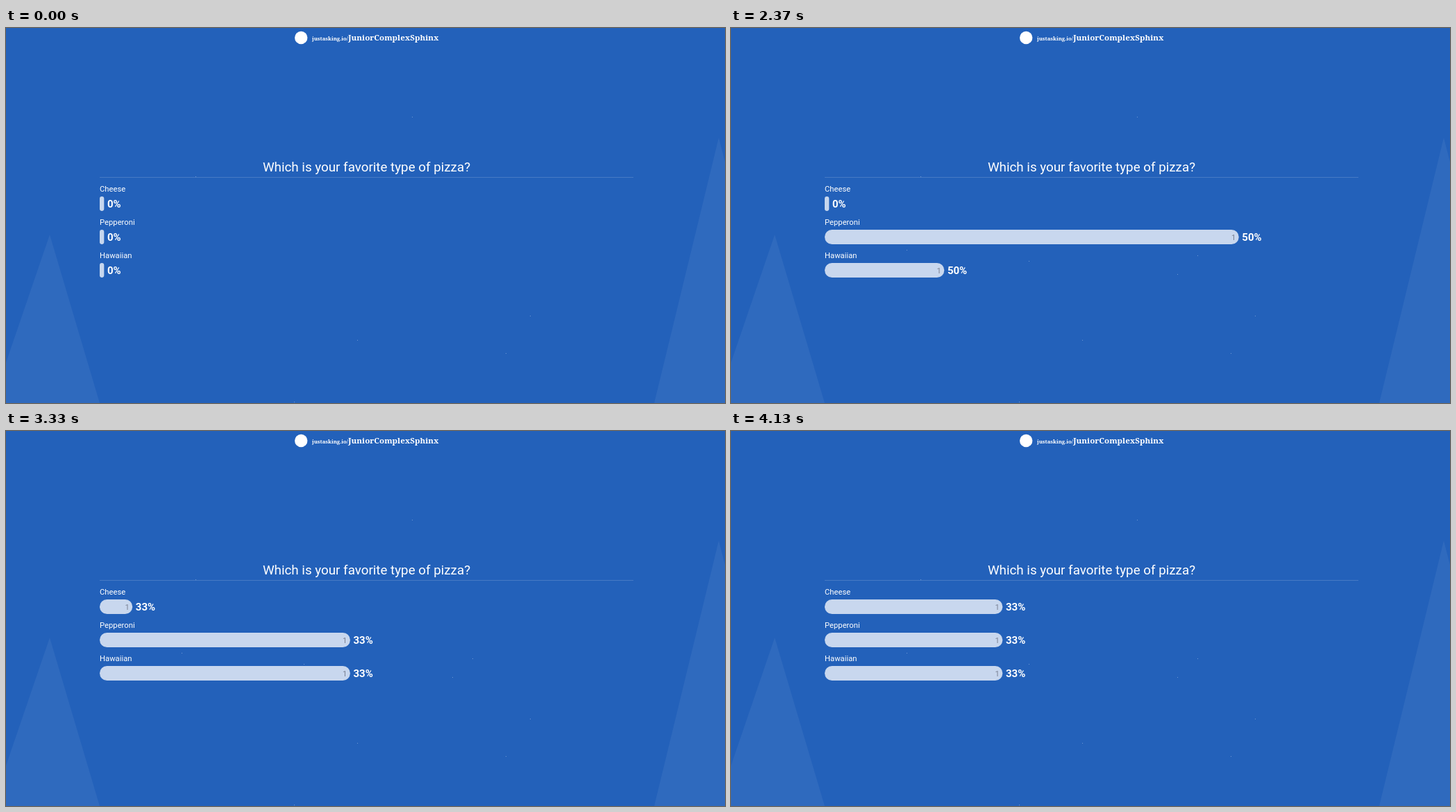
Write an HTML page that moves like this. It is 1036x541 px and loops after 4.82 s.

```html
<!DOCTYPE html>
<html lang="en">
<head>
<meta charset="utf-8">
<title>Live poll</title>
<style>
  html, body { margin: 0; width: 100%; height: 100%; overflow: hidden; background: #2361ba; }
  svg { display: block; width: 1036px; height: 541px; fill: #fff; font-family: Roboto, sans-serif; }
  .hill { fill-opacity: .055; }
  .specks { stroke: #fff; stroke-opacity: .35; }
  .host, .room { font-family: "Noto Serif", serif; font-weight: 700; }
  .host { font-size: 7.7px; text-anchor: end; }
  .room { font-size: 11.6px; }
  .ask { font-size: 18.8px; text-anchor: middle; }
  .name { font-size: 11.25px; }
  .bar { fill-opacity: .75; }
  .votes { font-size: 11.25px; fill: #7a8294; text-anchor: end; }
  .share { font-size: 15px; font-weight: 700; }
</style>
</head>
<body>
<svg viewBox="0 0 1036 541" xmlns="http://www.w3.org/2000/svg">
  <path class="hill" d="M63 298L135 541H-20Z"/>
  <path class="hill" d="M1027 158L1036 193V541H934Z"/>
  <path class="specks" d="M585 128.5h1M273 214.5h1M755 415.5h1M506 450.5h1M720 469.5h1M415 539.5h1"/>
  <path class="specks" id="late" d="M253 320.5h1M429 336.5h1M672 328.5h1M643 355.5h1"/>
  <circle cx="425.2" cy="14" r="9.2"/>
  <text class="host" x="493" y="18">justasking.io/</text>
  <text class="room" x="493" y="18">JuniorComplexSphinx</text>
  <text class="ask" x="519.5" y="207">Which is your favorite type of pizza?</text>
  <rect x="135" y="215" width="769" height="1" fill-opacity=".16"/>
  <g id="rows"></g>
</svg>
<script>
const LOOP = 4820, FIRST_VOTE = 670;
const MOVE = 2137, STEP = 73.2;      // screen refresh while bars move
const THIRD_VOTE = 14, RATE = .0782; // in steps; share of a move per step
const LEFT = 135, FULL = 769, BAR_H = 21, PAD = 6.3, DIGIT = 6.3;

const rowsBox = document.getElementById("rows");
const late = document.getElementById("late");

function set(el, attrs) {
  for (const key in attrs) el.setAttribute(key, attrs[key]);
}

function add(tag, attrs, text = "") {
  const el = document.createElementNS("http://www.w3.org/2000/svg", tag);
  set(el, attrs);
  el.textContent = text;
  return rowsBox.appendChild(el);
}

const rows = ["Cheese", "Pepperoni", "Hawaiian"].map((name, i) => {
  const y = 243 + i * 48;
  add("text", { class: "name", x: LEFT, y: y - 7 }, name);
  return {
    bar: add("rect", { class: "bar", x: LEFT, y, height: BAR_H }),
    votes: add("text", { class: "votes", y: y + 15 }),
    share: add("text", { class: "share", y: y + 16 })
  };
});

// cubic-bezier(.25, .1, .25, 1)
function ease(x) {
  if (x <= 0) return 0;
  if (x >= 1) return 1;
  const curve = (s, a, b) => 3 * a * s * (1 - s) ** 2 + 3 * b * s * s * (1 - s) + s ** 3;
  let lo = 0, hi = 1;
  for (let i = 0; i < 24; i++) {
    const mid = (lo + hi) / 2;
    if (curve(mid, .25, .25) < x) lo = mid; else hi = mid;
  }
  return curve(lo, .1, 1);
}

function drawRow(row, part, percent) {
  const voted = percent > 0;
  const label = `${percent}%`;
  const room = FULL - 13.4 - label.length * 8; // the label keeps its place
  const least = PAD + (voted ? DIGIT : 0);
  const w = Math.min(room, Math.max(least, part * FULL));
  const r = Math.min(w, BAR_H) / 2;
  set(row.bar, { width: w, rx: r, ry: r });
  set(row.votes, { x: LEFT + w - 4.5 });
  set(row.share, { x: LEFT + w + 4.6 });
  row.votes.textContent = voted ? "1" : "";
  row.share.textContent = label;
}

function draw(t) {
  const step = Math.floor((t - MOVE) / STEP);
  let parts = [0, 0, 0], shares = parts;
  if (step >= THIRD_VOTE) {
    const p = ease((step - THIRD_VOTE - .09) * RATE);
    const rest = 1 / 2 - p / 6;
    parts = [p / 3, rest, rest];
    shares = [33, 33, 33];
  } else if (step >= 0) {
    const p = ease((step + .43) * RATE);
    parts = [0, 1 - p / 2, p / 2];
    shares = [0, 50, 50];
  } else if (t >= FIRST_VOTE) {
    parts = [0, 1, 0];
    shares = [0, 100, 0];
  }
  rows.forEach((row, i) => drawRow(row, parts[i], shares[i]));
  set(late, { visibility: step >= 0 ? "visible" : "hidden" });
}

const begin = performance.now();
function tick() {
  draw((performance.now() - begin) % LOOP);
  requestAnimationFrame(tick);
}
tick();
</script>
</body>
</html>
```
